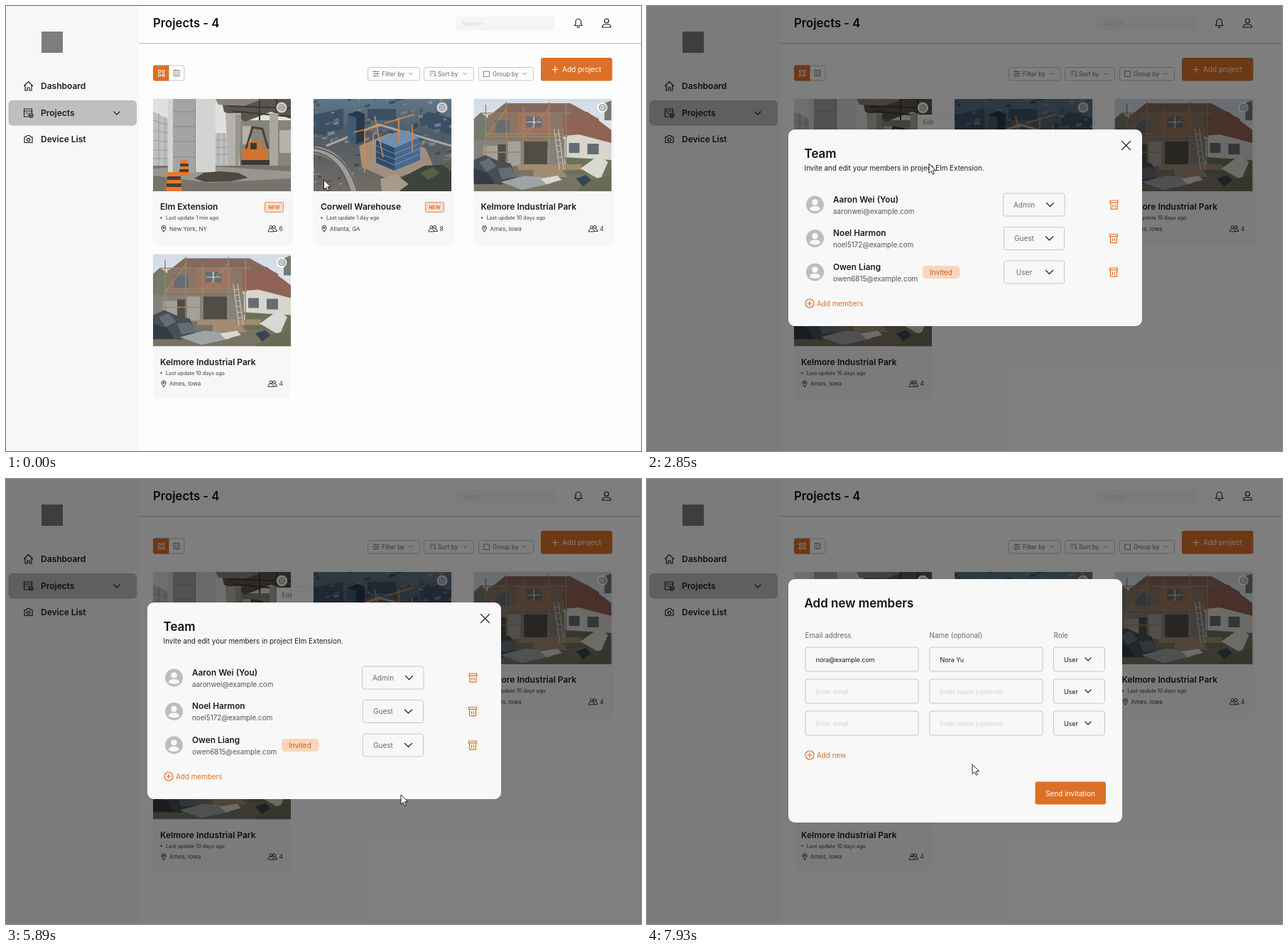
Write an HTML page that moves like this. It is 894 by 627 pixels and loops after 8 s.

```html
<!DOCTYPE html>
<html lang="en">
<head>
<meta charset="utf-8">
<title>Projects</title>
<style>
  html, body { margin: 0; width: 100%; height: 100%; overflow: hidden; background: #fdfdfd; }
  svg { display: block; }
  #stage { width: 894px; height: 627px; font-family: Inter, sans-serif; }
  .ink { fill: none; stroke: #222; stroke-width: 1.2; stroke-linecap: round; stroke-linejoin: round; }
  .thin { stroke: #777; stroke-width: .9; }
  .accent { stroke: #dc7028; }
  .box { fill: none; stroke: #c6c6c6; }
  .soft { filter: drop-shadow(1px 1px 2px rgba(0, 0, 0, .06)); }
  .pop { filter: drop-shadow(0 1px 2px rgba(0, 0, 0, .2)); }
  .hover { fill: #f8c8a8; fill-opacity: .75; }
</style>
</head>
<body>
<svg id="stage" viewBox="0 0 894 627">
  <defs>
    <linearGradient id="sky" x2="0" y2="1"><stop stop-color="#d3dce6"/><stop offset="1" stop-color="#eceff1"/></linearGradient>
    <linearGradient id="dusk" x2="0" y2="1"><stop stop-color="#5f7688"/><stop offset=".4" stop-color="#4f5b66"/><stop offset="1" stop-color="#746c63"/></linearGradient>

    <symbol id="bridge" viewBox="0 0 194 130">
      <path fill="#dfe0df" d="M0 0h194v130H0z"/>
      <path fill="#bdbfbf" d="M0 18l26 12v68H0zM62 48h46v48H62z"/>
      <path stroke="#94999a" fill="none" d="M0 30l26 8M0 44l26 5M0 58l26 3M0 72h26M0 84h26M8 20v76M17 26v70M88 58h18M88 68h18M88 78h18M92 48v46M100 48v46"/>
      <path fill="#85857a" d="M122 30h72v64h-72z"/>
      <path fill="#b4b3ab" d="M126 38h12v26h-12zM178 44h16v32h-16z"/>
      <path fill="#5a554c" d="M96 0h98v28l-28-10-36 14-30-14z"/>
      <path fill="#89847a" d="M88 0h66l-26 10-36-2z"/>
      <path stroke="#3a3732" stroke-width="2" d="M106 10l88 3M112 17l82 8M150 0v30M174 0v40"/>
      <path fill="#77736c" d="M0 94h194v36H0z"/>
      <path fill="#9a958d" d="M0 98l70-4 124 8v10L80 118 0 108z"/>
      <path fill="#d3d3d0" d="M21 0h8v105h-8zM60 0h28v103H60z"/>
      <path fill="#a2a4a6" d="M28 0h32v104H28z"/>
      <path stroke="#85888b" d="M28 18h32M28 39h32M28 60h32M28 82h32M59.500 0v104"/>
      <path fill="#b5b2ab" d="M102 20h22l-3 74h-15z"/>
      <path fill="#98958d" d="M116 22h8l-3 72h-5z"/>
      <path fill="#aaa79f" d="M164 20h12v74h-12z"/>
      <path stroke="#4a4035" stroke-width="3" fill="none" d="M131 70l9-30 14 2 8 28"/>
      <path fill="#d07430" d="M126 70h36v17h-36zM134 60h18v12h-18z"/>
      <path fill="#3b3a38" d="M137 62h9v9h-9zM124 86h40v7h-40z"/>
      <path fill="#4e4841" d="M58 112l14-8 22-2 26 2 14 7-24 5-36 1z"/>
      <path fill="#e37a2c" d="M39 86h10l2 22H37zM21 103h17l3 27H18z"/>
      <path fill="#433f3b" d="M38 91h12v4H38zM37 99h13v4H37zM20 109h19v5H20zM19 119h21v5H19z"/>
    </symbol>

    <symbol id="aerial" viewBox="0 0 194 130">
      <path fill="url(#dusk)" d="M0 0h194v130H0z"/>
      <path fill="#3a5065" d="M0 22l42-8v28L0 56zM150 15l44 12v24l-44-14zM76 14h40v16H76z"/>
      <g id="blocks"/>
      <path fill="#a08f7e" d="M64 66l44-18 50 22 10 24-60 20-40-18z"/>
      <g fill="none">
        <path stroke="#a09c95" stroke-width="11" d="M0 72q42 4 58 60"/>
        <path stroke="#565d63" stroke-width="2" d="M0 69q46 5 62 62M0 75q38 5 52 57"/>
        <path stroke="#aaa59d" stroke-width="3" d="M18 66L92 36l102 30"/>
      </g>
      <path fill="#27394a" d="M48 22l14-5 10 4v38l-12 5-12-5z"/>
      <path fill="#3f5a73" d="M48 22l12 4v38l-12-5z"/>
      <path fill="#6f8fab" d="M88 58l36-14 26 10-36 15z"/>
      <path fill="#2f4d6b" d="M88 58l26 11v32L88 90z"/>
      <path fill="#466a8d" d="M114 69l36-15v32l-36 15z"/>
      <path stroke="#92abc2" stroke-width=".7" fill="none" d="M88 66l26 11 36-15M88 74l26 11 36-15M88 82l26 11 36-15"/>
      <path fill="#3a443a" d="M122 112l34-18 38-2v38h-72z"/>
      <path fill="#566049" d="M150 104l18-8 10 8-16 10zM180 92l14-4v14z"/>
      <path fill="#a99b8b" d="M94 112l22-6 18 14-14 10H96z"/>
      <path stroke="#d9894c" stroke-width="1.600" fill="none" d="M72 42v62M56 47l38-9M84 50v44M120 26v36M100 34l42-12M86 24l12 58M139 36v38"/>
    </symbol>

    <symbol id="house" viewBox="0 0 194 130">
      <path fill="url(#sky)" d="M0 0h194v130H0z"/>
      <path fill="#747a6c" d="M0 28l10-9 11 9v34H0zM184 6l10-4v28h-10z"/>
      <path fill="#85695e" d="M24 22L44 6h92l40 22v12H24z"/>
      <path fill="#8b7567" d="M20 22h106v45H20z"/>
      <path fill="#a1735f" d="M62 20h48v28H62z"/>
      <path fill="#d9d5cd" d="M128 50l20-6 46 10v38h-66z"/>
      <path fill="#8f6355" d="M126 24l34-6 34 26v18l-46-12-22 2z"/>
      <path fill="#656c72" d="M134 62h15v14h-15zM160 63h16v15h-16zM74 25h22v15H74zM30 30h20v18H30z"/>
      <path fill="#dcdad4" d="M75 32h20v1H75zM84 25h1.500v15H84z"/>
      <path fill="#84827c" d="M0 58h70v40H0zM104 56h24v41h-24z"/>
      <path fill="#a4a098" d="M14 66h20v26H14zM48 60h18v34H48z"/>
      <path fill="#504c46" d="M70 60h34v38H70zM34 64h13v26H34z"/>
      <path fill="#777365" d="M0 95h194v35H0z"/>
      <path fill="#6b7058" d="M128 82l66 4v20h-62z"/>
      <path fill="#a08c70" d="M62 92h90v8H62zM84 100h40l8 10H84z"/>
      <path stroke="#9c8767" stroke-width="1.500" fill="none" d="M10 20h126M16 53h116M16 49h110M12 75h54M17 8v90M46 4v94M70 12v84M106 4v92M130 6v86M18 53l29-40M70 53l36-40"/>
      <path stroke="#cbc4b6" stroke-width="1.200" fill="none" d="M113 42l8 58M119 42l8 58M114 50h6M115 58h6M116 66h7M118 74h6M119 82h6M120 90h6"/>
      <path fill="#474e55" d="M0 86l16-7 18 8 18 4 8 20-22 10-38-6z"/>
      <path fill="#656d74" d="M8 89l14-6 10 12-14 8zM34 98l18-2 10 14-22 3z"/>
      <path fill="#353c43" d="M0 98l20 6 10 16H0z"/>
      <path fill="#9ea3a5" d="M38 117l34-9 30 3 8 8-42 9z"/>
      <path fill="#d9d8d1" d="M150 98l27-19 12 10-11 25zM94 112l24-4 6 6-22 6z"/>
      <path fill="#394451" d="M144 112l14-5 10 10-13 8z"/>
      <path fill="#676c55" d="M166 114l28-8v24h-50z"/>
    </symbol>

    <symbol id="gear" viewBox="-8 -8 16 16">
      <circle r="7.500" fill="#fff" fill-opacity=".72"/>
      <circle r="4" fill="none" stroke="#777" stroke-width="1.100"/><circle r="1.700" fill="none" stroke="#777" stroke-width=".9"/>
    </symbol>
    <g id="people" class="ink" style="stroke-width:.9"><circle cx="-2" cy="-2" r="2"/><circle cx="2.500" cy="-2" r="2"/><path d="M-6 4q0-4 4-4 3 0 4 4zM3 0q3 0 3.500 4H2"/></g>
    <path id="pin" class="ink" style="stroke-width:.9" d="M0 4.500Q-3 1-3-1a3 3 0 016 0q0 2-3 5.500zM-1-1a1 1 0 002 0 1 1 0 00-2 0"/>
    <path id="trash" class="ink accent" d="M-5.500-6h11v2.800h-11zM-4.500-3.200V6.200h9v-9.400M-1.500 0v3.200M1.500 0v3.200"/>
    <g id="plus" class="ink accent"><circle r="6"/><path d="M-3 0h6M0-3v6"/></g>
    <g id="avatar"><circle r="12.500" fill="#bdbdbd"/><circle cy="-3.500" r="4.200" fill="#f8f8f8"/><path fill="#f8f8f8" d="M-7.500 7q0-5 7.500-5t7.500 5q-7.500 4-15 0z"/></g>
  </defs>

  <g id="page"></g>
  <g id="menu"></g>
  <rect id="shade" width="894" height="627" fill-opacity=".5"/>
  <g id="team"></g>
  <g id="roles"></g>
  <g id="invite"></g>
  <g id="cursor" stroke="#111" stroke-linejoin="round" fill="#fff">
    <path id="arrow" d="M0 0v13.500l3.200-2.800 2.200 4.600 2.100-1-2.200-4.500h4.400z" stroke-width=".9"/>
    <path id="hand" d="M-1 1.500q1.200-1.700 2.500 0V8q1.200-1 2.300 0 1.300-.8 2.300.3 2-.5 2.400 1.400v3.800L7.300 18H.8L-3.400 11.500q-.4-2 1.200-1.800L-1 11zM3.800 8v2.500M6.100 8.300v2.400" stroke-width="1"/>
  </g>
</svg>

<script>
const $ = id => document.getElementById(id);
const ORANGE = '#dc7028', PEACH = '#f9d5bd', DARK = '#1c1c1c', GREY = '#6b6b6b';

const text = (x, y, s, size, fill = DARK, weight = 400, extra = '') =>
  `<text x="${x}" y="${y}" font-size="${size}" fill="${fill}" font-weight="${weight}" ${extra}>${s}</text>`;
const mid = (x, y, s, size, fill, weight) => text(x, y, s, size, fill, weight, 'text-anchor="middle"');
const rect = (x, y, w, h, r, attrs) => `<rect x="${x}" y="${y}" width="${w}" height="${h}" rx="${r}" ${attrs}/>`;
const line = (d, cls = '') => `<path class="ink ${cls}" d="${d}"/>`;
const use = (id, x, y) => `<use href="#${id}" x="${x}" y="${y}"/>`;
const chevron = (x, y, w, cls = '') => line(`M${x - w} ${y - w / 2}l${w} ${w}l${w} ${-w}`, cls);

// Small seeded buildings for the aerial view
let seed = 7;
const rnd = () => (seed = seed * 16807 % 2147483647) / 2147483647;
const tones = ['#2f4458', '#8b9199', '#6b7680', '#a08f7e', '#3d4b45'];
let blocks = '';
for (let i = 0; i < 260; i++) {
  blocks += rect(rnd() * 240 - 23, rnd() * 180 - 25, 2 + rnd() * 8, 1 + rnd() * 4, 0,
    `fill="${tones[i % 5]}" opacity=".75" transform="rotate(-12 97 65)"`);
}
$('blocks').innerHTML = blocks;

function card(x, y, photo, title, age, place, count, fresh, shadow) {
  return rect(x, y, 194, 203, 3, `fill="#f7f7f7" ${shadow ? 'class="soft"' : ''}`) +
    `<use href="#${photo}" x="${x}" y="${y}" width="194" height="130"/>` +
    `<use href="#gear" x="${x + 173}" y="${y + 4}" width="16" height="16"/>` +
    text(x + 10, y + 156, title, 12, DARK, 600) +
    `<circle cx="${x + 11.5}" cy="${y + 167.5}" r="1.2" fill="#555"/>` +
    text(x + 18, y + 170, `Last update ${age} ago`, 7.2, '#555', 500) +
    use('pin', x + 15, y + 182.5) + text(x + 23, y + 185.5, place, 8.1, '#444') +
    use('people', x + 168, y + 182.5) + text(x + 177.5, y + 185.5, count, 8.5, '#333') +
    (fresh ? rect(x + 157.5, y + 145.5, 26, 14, 2, 'fill="#fbdcc6" stroke="#e19159"') +
      mid(x + 170.5, y + 155, 'NEW', 6.7, '#cf6a27', 600) : '');
}

const tool = (x, w, tx, label) =>
  rect(x + .5, 86.5, w, 18.5, 3, 'class="box"') + text(tx, 99, label, 8.4, '#666') +
  chevron(x + w - 12, 95.5, 2.2, 'thin');

$('page').innerHTML =
  rect(0, 0, 894, 627, 0, 'fill="#fdfdfd"') + rect(0, 0, 187, 627, 0, 'fill="#f7f7f7"') +
  rect(187, 52, 707, 1.2, 0, 'fill="#c4c4c4"') +
  rect(50, 36, 30, 30, 0, 'fill="#7d7d7d"') +
  rect(4, 133.5, 179.5, 34.5, 5, 'fill="#bfbfbf" stroke="#b0b0b0" stroke-width=".8"') +
  line('M25.5 112.5l6-6 6 6M27 111.5v7.5h3v-4h3v4h3v-7.5') +
  line('M31 156h-5.5v-11h11v5M25.5 148h11M28 151h3M38 154a3 3 0 01-6 0 3 3 0 016 0M33.5 154h3M35 152.5v3') +
  line('M26 184.5h2.5l1-2h4l1 2H37v8H26zM33.7 188.5a2.2 2.2 0 01-4.4 0 2.2 2.2 0 014.4 0') +
  text(49, 117, 'Dashboard', 12, DARK, 600) + text(49, 154.5, 'Projects', 12, DARK, 600) +
  text(49, 192, 'Device List', 12, DARK, 600) + chevron(156, 151, 4) +
  text(207, 30, 'Projects - 4', 16.7, '#111', 600) +
  rect(633, 15, 140, 19.5, 3, 'fill="#f5f5f5"') + text(642, 28, 'Search', 8.5, '#d6d6d6') +
  line('M800.5 27.5h10.5l-1.5-2.5v-3a3.7 3.7 0 00-7.5 0v3zM804 29.5q1.7 1.2 3.5 0') +
  line('M848.5 21a3 3 0 01-6 0 3 3 0 016 0M839.5 30q0-4 3.5-4h5q3.5 0 3.5 4z') +
  rect(207.5, 84, 43.5, 21, 3, 'class="box"') +
  `<path fill="${ORANGE}" d="M210 83.5h19.5v22H210a3 3 0 01-3-3v-16a3 3 0 013-3z"/>` +
  '<path fill="none" stroke="#fff" d="M214.5 90.5h3v3h-3zM220 90.5h3v3h-3zM214.5 96h3v3h-3zM220 96h3v3h-3z"/>' +
  line('M236.5 90.5h7.5v8h-7.5zM239 90.5v8M241 93h1.5M241 96h1.5', 'thin') +
  tool(509, 73, 529, 'Filter by') + line('M517 92.5h8M517 95.5h8M517 98.5h8M519.5 91.5v2M522.5 94.5v2M519 97.5v2', 'thin') +
  tool(588, 70, 608, 'Sort by') + line('M597 92h6M597 95h4M597 98h2M604 92v7l-1.5-1.5M604 99l1.5-1.5', 'thin') +
  tool(665, 77, 685, 'Group by') + line('M673 92h7.5v7.5H673z', 'thin') +
  rect(753, 73, 100.5, 32.5, 3, `fill="${ORANGE}"`) +
  '<path stroke="#fff" stroke-width="1.2" d="M768.5 89.5h9M773 85v9"/>' + text(783, 93, 'Add project', 10, '#fff') +
  card(207, 131, 'bridge', 'Elm Extension', '1 min', 'New York, NY', 6, true, true) +
  card(433, 131, 'aerial', 'Corwell Warehouse', '1 day', 'Atlanta, GA', 8, true, true) +
  card(658.5, 131, 'house', 'Kelmore Industrial Park', '10 days', 'Ames, Iowa', 4, false, true) +
  card(207, 349.5, 'house', 'Kelmore Industrial Park', '10 days', 'Ames, Iowa', 4, false, false);

$('menu').innerHTML =
  '<circle cx="388.5" cy="143.5" r="7.5" fill="#f4f4f4"/>' +
  '<use href="#gear" x="380.5" y="135.5" width="16" height="16"/>' +
  rect(381, 153, 52, 100, 2, 'fill="#fcfcfc" class="pop"') + rect(381, 233, 52, 20, 2, 'fill="#f3f3f3"') +
  '<path stroke="#e9e9e9" stroke-width=".8" d="M381 173h52M381 193h52M381 213h52"/>' +
  ['Edit', 'Rename', 'Duplicate', 'Team', 'Archive'].map((s, i) => text(388.5, 166.5 + i * 20, s, 8.3, '#777')).join('') +
  rect(381, 153, 52, 20, 0, 'id="menuHover" class="hover"');

const members = [
  ['Aaron Wei (You)', 'aaronwei@example.com', 'Admin'],
  ['Noel Harmon', 'noel5172@example.com', 'Guest'],
  ['Owen Liang', 'owen6815@example.com', 'User']
];
const dialog = (y, w, h, title) =>
  rect(199, y, w, h, 9, 'fill="#f8f8f8"') + text(221.5, y + 39.5, title, 17, '#111', 600);

$('team').innerHTML = dialog(174, 498, 277, 'Team') +
  line('M668.5 190.5l12 12M680.5 190.5l-12 12') +
  text(221.5, 231.5, 'Invite and edit your members in project Elm Extension.', 9.9, DARK) +
  members.map(([name, mail, role], i) => {
    const y = 280 + i * 47.5, end = i ? 0 : 1;
    return use('avatar', 236.5, y) + text(262, y - 3.5, name, 11.8, DARK, 600) +
      text(262, y + 12.5, mail, 9.9, '#555') +
      rect(502.5 - end, y - 16, 85 + end * 1.5, 32, 3, 'class="box"') +
      `<g ${i == 2 ? 'id="role"' : ''}>${mid(531, y + 3.5, role, 10, GREY)}</g>` +
      `<g ${i == 2 ? 'id="roleMark"' : ''}>${chevron(566.5 + end, y, 5)}</g>` + use('trash', 657 + end / 2, y);
  }).join('') +
  rect(388, 366, 52.5, 18, 5, `fill="${PEACH}"`) + mid(414, 378.7, 'Invited', 10, '#cb641f') +
  use('plus', 229, 419) + text(239, 422.7, 'Add members', 9.9, ORANGE);

$('roles').innerHTML = rect(502, 394, 86, 60, 2, 'fill="#fdfdfd" class="pop"') +
  ['Admin', 'User', 'Guest'].map((s, i) => text(509.5, 407 + i * 20, s, 8.1, '#777')).join('') +
  rect(502, 394, 86, 20, 0, 'id="roleHover" class="hover"');

const field = (x, y, w, s, fill) =>
  rect(x, y, w, 34, 3, 'class="box"') + text(x + 14.5, y + 20.5, s, 9, fill, 400, 'letter-spacing="-.1"');

$('invite').innerHTML = dialog(141, 470, 343, 'Add new members') +
  text(222.5, 223.7, 'Email address', 9.9, '#666') + text(397.5, 223.7, 'Name (optional)', 9.9, '#666') +
  text(572.5, 223.7, 'Role', 9.9, '#666') +
  [0, 1, 2].map(i => {
    const y = 237 + i * 45, tone = i ? '#d2d2d2' : DARK;
    return field(223, y, 159, i ? 'Enter email' : 'nora@example.com', tone) +
      field(398, y, 159, i ? 'Enter name (optional)' : 'Nora Yu', tone) +
      field(572.5, y, 72, 'User', DARK) + chevron(621, y + 17, 4);
  }).join('') +
  use('plus', 229, 389) + text(239, 392.7, 'Add new', 9.9, ORANGE) +
  rect(546.5, 426.5, 99.5, 32, 3, `fill="${ORANGE}"`) + mid(596, 446.5, 'Send invitation', 10, '#fff');

// start, end, steps, target x, target y, upward bend
const moves = [
  [80, 700, 9, 392, 142, 0], [1780, 2320, 8, 397, 222, 0], [3330, 4100, 11, 585, 354, 0],
  [4190, 4420, 4, 567, 381, 0], [5130, 5430, 5, 556, 445, 0], [6310, 7000, 10, 281, 414, 108],
  [7850, 7930, 2, 458, 402, 0]
];
const ease = p => p * p * (3 - 2 * p);

function cursorAt(t) {
  let x = 447.5, y = 245;
  for (const [start, end, n, tx, ty, bend] of moves) {
    if (t < start) break;
    const step = Math.floor((t - start) * (n - 1) / (end - start) + .05) + 1;
    const p = ease(Math.min(1, step / n));
    x += (tx - x) * p;
    y += (ty - y) * p - bend * p * (1 - p) * 2;
  }
  return [x, y];
}

const show = (id, on) => $(id).setAttribute('visibility', on ? 'visible' : 'hidden');
const within = ([x, y], l, t, r, b) => x >= l && x < r && y >= t && y < b;

function hover(id, on, top, y) {
  show(id, on);
  if (on) $(id).setAttribute('y', top + 20 * Math.floor((y - top) / 20));
}

function render(t) {
  const at = cursorAt(t);
  const menu = t >= 1230, modal = t >= 2850, roles = t >= 4880 && t < 5890, invite = t >= 7470;
  const inMenu = menu && !modal && within(at, 381, 153, 433, 253);
  const inRoles = roles && within(at, 502, 394, 588, 454);
  const inSelect = [264, 311, 359].some(y => within(at, 502, y, 588, y + 32));
  const hand = inMenu || inRoles || modal && !invite && (inSelect || within(at, 222, 410, 305, 428));

  show('menu', menu);
  show('shade', modal);
  show('team', modal && !invite);
  show('roles', roles);
  show('invite', invite);
  hover('menuHover', inMenu, 153, at[1]);
  hover('roleHover', inRoles, 394, at[1]);
  $('role').firstChild.textContent = t < 5890 ? 'User' : 'Guest';
  $('roleMark').setAttribute('transform', roles ? 'matrix(1 0 0 -1 0 750)' : '');
  show('arrow', !hand);
  show('hand', hand);
  $('cursor').setAttribute('transform', `translate(${at})`);
}

const origin = performance.now();
(function frame() {
  render((performance.now() - origin) % 8000);
  requestAnimationFrame(frame);
})();
</script>
</body>
</html>
```
